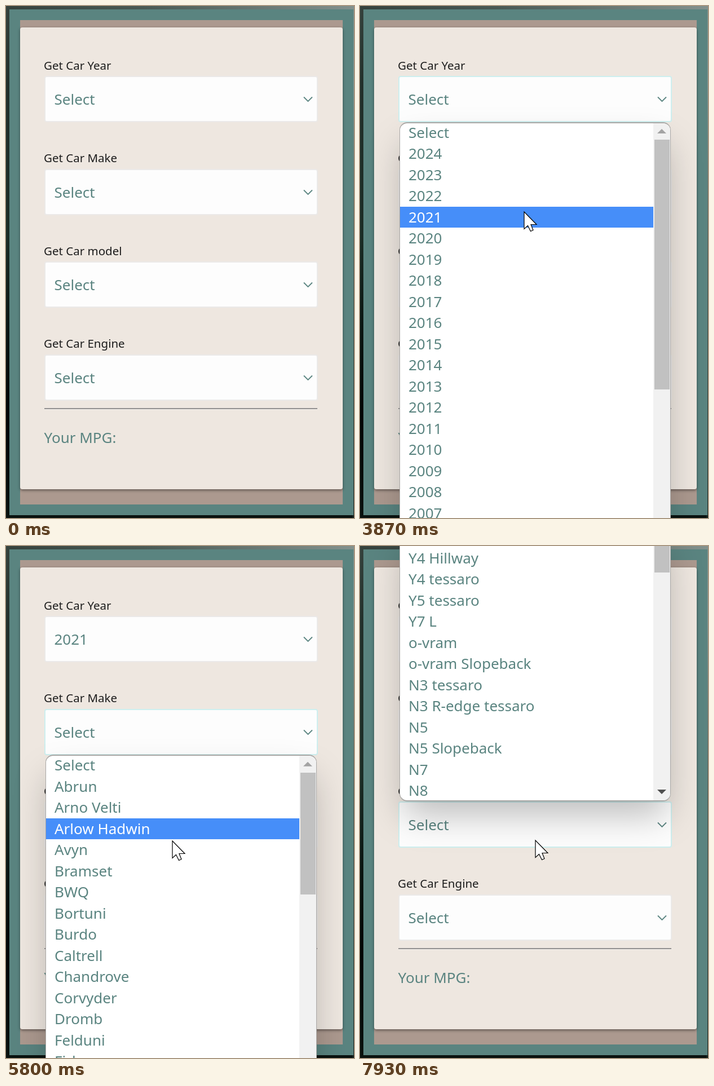
An HTML page that plays this animation: 617x908 px, repeating every 8000 ms.

```html
<!DOCTYPE html>
<html lang="en">
<head>
<meta charset="utf-8">
<title>Car MPG form</title>
<style>
  * { box-sizing: border-box; }
  html, body { margin: 0; width: 100%; height: 100%; overflow: hidden; }
  body {
    position: relative;
    font: 26px "Noto Sans", "Open Sans", sans-serif;
    color: #5a8480;
    background:
      linear-gradient(90deg, #35423d, #4a5a55 40%, #83918d) 0 0 / 100% 7px no-repeat,
      linear-gradient(#83918d, #8b9794 15%, #45544f 50%, #16211d) 100% 0 / 3px 100% no-repeat,
      linear-gradient(#35423d, #22302b 15%, #1b2d26 45%, #0b1713 62%, #020504 80%, #0a120f);
  }
  body * { position: absolute; }
  .frame { left: 6px; top: 6px; width: 610px; height: 897px; background: #ac998f; border: 19px solid #5a8480; }
  .card { left: 25px; top: 38px; width: 572px; height: 819px; background: #eee7e0; border-radius: 4px; box-shadow: 0 2px 5px rgba(0,0,0,.45); }
  .label { left: 67px; font-size: 20.5px; line-height: 30px; color: #1c1c1c; white-space: nowrap; }
  .select { left: 68px; width: 485px; height: 82px; padding-left: 15.5px; line-height: 78px; background: #fdfdfd; border: 2px solid #ebe9e8; border-radius: 4px; }
  .select.focus { border-color: #cdefef; }
  .select svg { left: 456px; top: 33px; }
  .rule { left: 68px; top: 713px; width: 484px; height: 3px; border-top: 2px solid #929090; border-bottom: 1px solid #f5f2ee; }
  .mpg { left: 67.5px; top: 745px; line-height: 40px; white-space: nowrap; }
  .list { left: 70px; width: 481px; background: #fff; border: solid #a9a7a5; border-width: 2px 1px; border-radius: 14px; overflow: hidden; box-shadow: 0 32px 64px -8px rgba(0,0,0,.26); }
  .option { left: 0; width: 449px; height: 37.5px; padding-left: 15px; line-height: 37.5px; white-space: nowrap; }
  .option.on { background: #468ef9; color: #fff; }
  .track { left: 449px; top: -2px; bottom: -2px; width: 30px; background: #f1f1f1; }
  .thumb { left: 2px; width: 27px; background: #c1c1c1; }
  .arrow { left: 7px; width: 16px; height: 8px; }
  .arrow.up { top: 12.5px; background: #a3a3a3; clip-path: polygon(50% 0, 100% 100%, 0 100%); }
  .arrow.down { bottom: 12.5px; background: #505050; clip-path: polygon(0 0, 100% 0, 50% 100%); }
  #cursor { left: 0; top: 0; overflow: visible; }
</style>
</head>
<body>
<div class="frame"></div>
<div class="card"></div>
<div class="rule"></div>
<div class="mpg">Your MPG:</div>
<svg id="cursor" width="24" height="36">
  <path d="M0 0V30.5L6.5 24.5L11.5 34.5L16 32.5L12 22.5H22Z" fill="#fff" stroke="#000" stroke-width="1.2"/>
</svg>
<script>
const LOOP = 8000, ROW = 37.5, LIST_BORDER = 2, HOVER_LAG = 100;
const cursor = document.getElementById('cursor');

function add(parent, className, style = {}, text = '') {
  const el = document.createElement('div');
  el.className = className;
  el.textContent = text;
  Object.assign(el.style, style);
  parent === document.body ? parent.insertBefore(el, cursor) : parent.append(el);
  return el;
}
const px = n => n + 'px';

const fields = ['Year', 'Make', 'model', 'Engine'].map((name, i) => {
  const top = 124 + i * 164.6;
  add(document.body, 'label', { top: px(top - 34.5) }, 'Get Car ' + name);
  const box = add(document.body, 'select', { top: px(top) });
  const value = document.createElement('span');
  box.append(value);
  box.insertAdjacentHTML('beforeend',
    '<svg width="18" height="12"><path d="M2 2.5L9.5 10L17 2.5" fill="none" stroke="#5a8480" stroke-width="1.8"/></svg>');
  return { box, value };
});

const years = Array.from({ length: 19 }, (_, i) => String(2024 - i));
const makes = ['Abrun', 'Arno Velti', 'Arlow Hadwin', 'Avyn', 'Bramset', 'BWQ', 'Bortuni', 'Burdo',
  'Caltrell', 'Chandrove', 'Corvyder', 'Dromb', 'Felduni', 'Firl'];
const models = ['Y4 Slopeback tourney', 'Y4 Hillway', 'Y4 tessaro', 'Y5 tessaro', 'Y7 L', 'o-vram',
  'o-vram Slopeback', 'N3 tessaro', 'N3 R-edge tessaro', 'N5', 'N5 Slopeback', 'N7', 'N8'];

const lists = [
  { top: 205.5, items: ['Select', ...years], thumb: [31.5, 443], arrow: 'up', open: 2530, close: 4540, hover: true },
  { top: 370.3, items: ['Select', ...makes], thumb: [31.5, 216.5], arrow: 'up', open: 5200, close: 6430, hover: true },
  { top: -35, items: models, thumb: [0, 81.5], arrow: 'down', open: 7850, close: LOOP, hover: false }
];
for (const list of lists) {
  list.el = add(document.body, 'list', { top: px(list.top), height: px(list.items.length * ROW) });
  list.options = list.items.map((text, i) => add(list.el, 'option', { top: px(i * ROW - LIST_BORDER) }, text));
  const track = add(list.el, 'track');
  add(track, 'thumb', { top: px(list.thumb[0]), height: px(list.thumb[1]) });
  add(track, 'arrow ' + list.arrow);
}

// Pointer path: time, x, y
const path = [
  [1400, 640, 330], [2070, 342, 186], [2450, 338, 172], [2700, 338, 172], [3200, 314, 284],
  [3800, 291, 365], [4600, 291, 365], [5050, 300, 330], [5250, 300, 330], [5800, 295, 523],
  [6100, 291, 540], [6600, 291, 540], [7400, 311, 522], [LOOP, 311, 522]
];
function pointer(t) {
  const next = path.findIndex(key => key[0] > t);
  if (next < 1) return path[0].slice(1);
  const [t0, x0, y0] = path[next - 1], [t1, x1, y1] = path[next];
  const u = (t - t0) / (t1 - t0), e = u * u * (3 - 2 * u);
  return [x0 + (x1 - x0) * e, y0 + (y1 - y0) * e];
}

function render(t) {
  const [x, y] = pointer(t);
  cursor.style.transform = `translate(${x}px, ${y}px)`;

  const focused = t < 2470 ? -1 : t < 5130 ? 0 : t < 7800 ? 1 : 2;
  const values = [t < 4670 ? 'Select' : '2021', t < 6530 ? 'Select' : 'Avyn', 'Select', 'Select'];
  fields.forEach(({ box, value }, i) => {
    box.classList.toggle('focus', i === focused);
    value.textContent = values[i];
  });

  const hoverY = pointer(t - HOVER_LAG)[1];
  for (const list of lists) {
    const shown = t >= list.open && t < list.close;
    list.el.style.display = shown ? 'block' : 'none';
    const active = list.hover ? Math.max(0, Math.floor((hoverY - list.top) / ROW)) : -1;
    list.options.forEach((option, i) => option.classList.toggle('on', i === active));
  }
}

const start = performance.now();
function tick() {
  render((performance.now() - start) % LOOP);
  requestAnimationFrame(tick);
}
tick();
</script>
</body>
</html>
```
